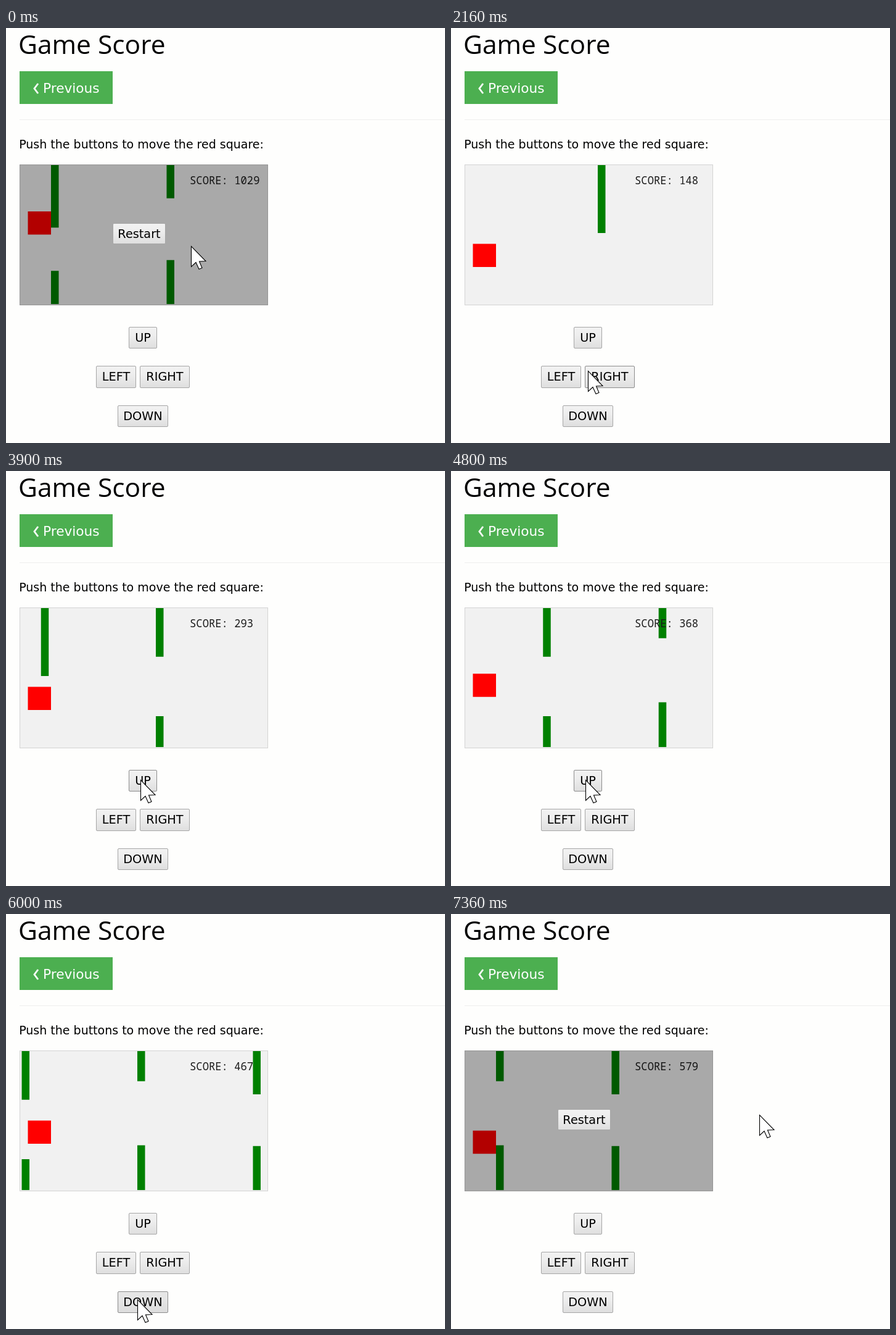
An HTML page with a canvas for the animation above (7.4 s loop, 712 by 672 pixels).

```html
<!DOCTYPE html>
<html lang="en">
<head>
<meta charset="utf-8">
<title>Game Score</title>
<style>
  html, body { margin: 0; width: 100%; height: 100%; overflow: hidden; background: #fefefd; }
  canvas { display: block; }
</style>
</head>
<body>
<canvas id="stage" width="712" height="672"></canvas>
<script>
const ctx = document.getElementById('stage').getContext('2d');
const LOOP = 7400;
const SANS = '"DejaVu Sans", sans-serif';

// Game board: 320 x 180 units, shown at 1.25
const BOARD = { x: 23, y: 222, scale: 1.25, w: 320, h: 180 };
const CRASH = 579;
const EARLIER = { score: 1029, y: 60, over: true };

// Walls: birth tick, bottom of the upper part, top of the lower part
const WALLS = [[0, 88, 180], [149, 63, 140], [299, 39, 122], [449, 56, 123]];
const EARLIER_WALLS = [[749, 81, 137], [899, 43, 123]];

// Button presses: first tick, last tick, direction
const PRESSES = [
  { from: 88, to: 115, dir: 1, button: 'DOWN' },
  { from: 308, to: 325, dir: -1, button: 'UP' },
  { from: 462, to: 480, dir: 1, button: 'DOWN' }
];

const BUTTONS = [
  { label: 'UP', x: 199, y: 484, w: 46, h: 35 },
  { label: 'LEFT', x: 146, y: 547, w: 65, h: 36 },
  { label: 'RIGHT', x: 217, y: 547, w: 81, h: 36 },
  { label: 'DOWN', x: 181, y: 611, w: 82, h: 35 }
];
const RESTART = { label: 'Restart', x: 173, y: 316, w: 86, h: 34 };

// Pointer path: time, x, y
const PATH = [
  [100, 300, 353], [290, 238, 338], [480, 236, 339], [830, 232, 408],
  [1260, 230, 634], [1880, 230, 635], [2350, 217, 501], [2900, 217, 500],
  [3200, 217, 500], [3500, 218, 500], [5080, 218, 500], [5430, 214, 599],
  [5640, 213, 624], [6480, 213, 624], [6960, 376, 408], [7300, 500, 325]
];
const ARROW = [[0.5, 0.5], [0.5, 33.5], [8, 26.5], [13, 37.5], [18, 35.5], [13.5, 25], [24, 24.5]];

const clamp = (v, lo, hi) => Math.min(hi, Math.max(lo, v));

function rect(color, x, y, w, h) {
  ctx.fillStyle = color;
  ctx.fillRect(x, y, w, h);
}

function text(str, x, y, font, color = '#000', align = 'left') {
  ctx.font = font;
  ctx.fillStyle = color;
  ctx.textAlign = align;
  ctx.fillText(str, x, y);
}

// Time snapped to 30 pictures a second, in whole hundredths
function snap(ms) {
  let n = Math.floor((Math.floor(ms / 10) * 10 + 9) * 0.03);
  if (n < 3) return 0;
  if (n === 181) n = 180;
  return Math.floor(n * 10 / 3) * 10;
}

function gameAt(t) {
  const tick = Math.floor(81.9 + 0.08319 * (t - 1360));
  if (tick < 1) return { ...EARLIER, walls: EARLIER_WALLS };
  const score = Math.min(tick, CRASH);
  let y = 75, pressed = '';
  for (const p of PRESSES) {
    y += p.dir * clamp(score - p.from, 0, p.to - p.from);
    if (score >= p.from && score < p.to) pressed = p.button;
  }
  return { score, y, pressed, over: tick >= CRASH, walls: WALLS };
}

function pointerAt(t) {
  const last = PATH[PATH.length - 1];
  if (t <= PATH[0][0]) return PATH[0].slice(1);
  if (t >= last[0]) return last.slice(1);
  const i = PATH.findIndex(p => p[0] > t);
  const [t0, x0, y0] = PATH[i - 1], [t1, x1, y1] = PATH[i];
  const k = (t - t0) / (t1 - t0);
  return [Math.round(x0 + (x1 - x0) * k), Math.round(y0 + (y1 - y0) * k)];
}

function drawPage() {
  rect('#fefefd', 0, 0, 712, 672);
  text('Game Score', 20, 42, '42.5px "Open Sans", sans-serif');
  rect('#4caf50', 22, 70, 151, 53);
  ctx.strokeStyle = '#fff';
  ctx.lineWidth = 2.8;
  ctx.beginPath();
  ctx.moveTo(52, 90);
  ctx.lineTo(46, 98);
  ctx.lineTo(52, 106);
  ctx.stroke();
  text('Previous', 60, 105, '21.7px ' + SANS, '#fff');
  rect('#eeeeee', 22, 148, 690, 1);
  text('Push the buttons to move the red square:', 21.2, 195, '19px ' + SANS);
}

function drawBoard(game) {
  const { x, y, scale, w, h } = BOARD;
  rect('#d3d3d3', x - 1, y - 1, w * scale + 3, h * scale + 3);
  rect('#f1f1f1', x, y, w * scale + 1, h * scale + 1);
  ctx.save();
  ctx.beginPath();
  ctx.rect(x, y, w * scale, h * scale);
  ctx.clip();
  ctx.translate(x, y);
  ctx.scale(scale, scale);
  rect('#ff0000', 10, game.y, 30, 30);
  for (const [born, top, low] of game.walls) {
    if (game.score <= born) continue;
    const left = w - (game.score - born);
    rect('#008000', left, 0, 10, top);
    rect('#008000', left, low, 10, h - low);
  }
  ctx.restore();
  text('SCORE: ' + game.score, x + 275, y + 31.25, '17.2px "Noto Sans Mono", monospace', '#1c1c1c');
  if (game.over) rect('rgba(0,0,0,0.3)', x - 1, y - 1, w * scale + 3, h * scale + 3);
}

function drawButton(b, [px, py], down) {
  const hover = px >= b.x && px < b.x + b.w && py >= b.y && py < b.y + b.h;
  const fill = ctx.createLinearGradient(0, b.y, 0, b.y + b.h);
  fill.addColorStop(0, down ? '#e7e7e7' : '#f2f2f2');
  fill.addColorStop(0.38, down ? '#e5e5e5' : '#eeeeee');
  fill.addColorStop(1, down ? '#dcdcdc' : '#dedede');
  ctx.fillStyle = fill;
  ctx.strokeStyle = hover ? '#8c8c8c' : '#a6a6a6';
  ctx.lineWidth = 1;
  ctx.beginPath();
  ctx.roundRect(b.x + 0.5, b.y + 0.5, b.w - 1, b.h - 1, 1.5);
  ctx.fill();
  ctx.stroke();
  text(b.label, b.x + b.w / 2, b.y + 24, '19.3px ' + SANS, '#000', 'center');
}

function drawPointer([x, y]) {
  ctx.beginPath();
  for (const [dx, dy] of ARROW) ctx.lineTo(x + dx, y + dy);
  ctx.closePath();
  ctx.fillStyle = '#fff';
  ctx.strokeStyle = '#000';
  ctx.lineWidth = 1.1;
  ctx.fill();
  ctx.stroke();
}

function draw(now) {
  const t = snap(now % LOOP);
  const game = gameAt(t);
  const pointer = pointerAt(t);
  drawPage();
  drawBoard(game);
  if (game.over) drawButton(RESTART, pointer, t > 310 && t < 400);
  for (const b of BUTTONS) drawButton(b, pointer, game.pressed === b.label);
  drawPointer(pointer);
  requestAnimationFrame(draw);
}
draw(0);
</script>
</body>
</html>
```
